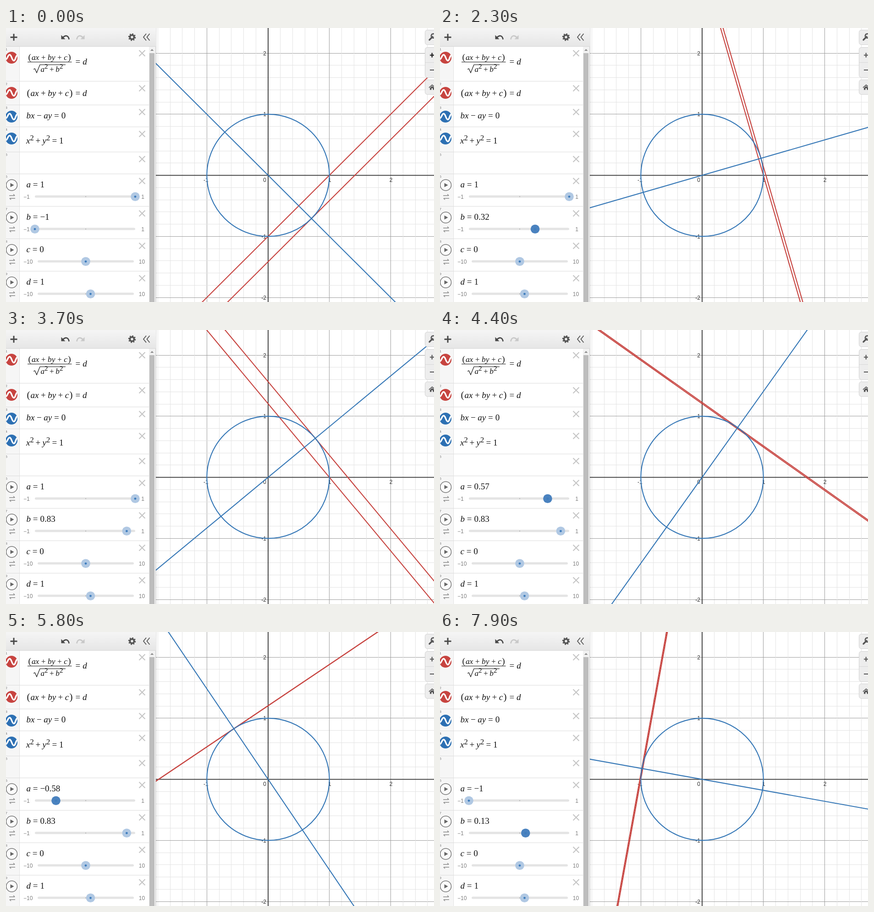
Recreate the animation shown at these times as an HTML page. Size 934 px wide and 600 px high, loop 8000 ms.

```html
<!DOCTYPE html>
<html lang="en">
<head>
<meta charset="utf-8">
<title>Line and unit circle</title>
<style>
html, body { margin: 0; width: 100%; height: 100%; overflow: hidden; background: #fff; }
svg { display: block; width: 934px; height: 600px; }
.math { font: 19px "Liberation Serif", "Times New Roman", serif; fill: #111; }
.it { font-style: italic; }
.axis { font: 12px "Liberation Sans", Arial, sans-serif; fill: #333; }
.small { font: 12px "Liberation Sans", Arial, sans-serif; fill: #808080; }
.num { font: 8px "Liberation Sans", Arial, sans-serif; fill: #777; }
.curve { fill: none; stroke-width: 2.1; }
.red { stroke: #c74440; }
.blue { stroke: #3577b6; }
</style>
</head>
<body>
<svg id="stage" viewBox="0 0 934 600"></svg>
<script>
const NS = "http://www.w3.org/2000/svg";
const stage = document.getElementById("stage");
const CX = 572, CY = 322.6, UNIT = 133.75;
const RED = "#c74440", BLUE = "#2d70b3";

function add(tag, attrs, parent = stage) {
  const el = document.createElementNS(NS, tag);
  for (const k in attrs) el.setAttribute(k, attrs[k]);
  parent.appendChild(el);
  return el;
}
const rect = (x, y, width, height, fill, more) => add("rect", { x, y, width, height, fill, ...more });
const path = (d, stroke, width, more) =>
  add("path", { d, fill: "none", stroke, "stroke-width": width, ...more });
const shape = (d, fill, more) => add("path", { d, fill, ...more });
function text(x, y, cls, str, anchor = "start") {
  const el = add("text", { x, y, class: cls, "text-anchor": anchor });
  el.textContent = str;
  return el;
}

// Pieces: "text|options", options: i = italic, ^ = superscript, p = tall bracket, number = gap before
function formula(x, y, size, pieces) {
  const el = add("text", { x, y, class: "math", style: `font-size:${size}px` });
  let raised = false;
  return pieces.map(p => {
    const [str, opt = ""] = p.split("|");
    const t = add("tspan", {}, el);
    t.textContent = str;
    const gap = parseFloat(opt.replace(/[^\d.]/g, ""));
    if (gap) t.setAttribute("dx", gap);
    if (opt.includes("i")) t.setAttribute("class", "it");
    if (opt.includes("p")) t.setAttribute("font-size", size * 1.1);
    const up = opt.includes("^");
    if (up) t.setAttribute("font-size", size * 0.87);
    if (up !== raised) t.setAttribute("dy", up ? -7 : 7);
    raised = up;
    return t;
  });
}

function drawGrid() {
  for (let i = -10; i <= 14; i++) {
    const major = i % 5 === 0;
    const stroke = major ? "#9c9c9c" : "#e3e3e3";
    const x = Math.floor(CX + i * UNIT / 5) + 0.5;
    const y = Math.floor(CY + i * UNIT / 5) + 0.5;
    if (i) path(`M${x} 0V600`, stroke, 1);
    if (i) path(`M327 ${y}H934`, stroke, 1);
  }
  path(`M${CX} 0V600`, "#333", 1.8);
  path(`M327 ${CY}H934`, "#333", 1.8);
  for (const n of [2, 1, -1, -2]) {
    text(568, CY - n * UNIT + 4.5, "axis", n, "end");
    if (n > -2) text(CX + n * UNIT + (n < 0 ? -2 : 0.5), 337, "axis", n, "middle");
  }
  text(568, 337, "axis", "0", "end");
}

function drawButtons() {
  const box = (y, h) => rect(914.5, y + 0.5, 40, h, "#ededed", { rx: 5, stroke: "#d2d2d2" });
  box(4, 32);
  box(42, 66);
  box(113, 32);
  path("M915 75.5H934", "#d8d8d8", 1);
  path("M924 26L931 19", "#555", 3.4, { "stroke-linecap": "round" });
  path("M936 20A4.5 4.5 0 1 1 934 13", "#555", 2.6);
  const plus = path("M925 59.5H934M929.7 54.5V64.5", "#555", 2.2);
  path("M925 92H934", "#555", 2);
  shape("M922.5 130L930 123.5L937.5 130L936.5 131.2L930 125.8L923.5 131.2Z", "#555");
  shape("M925 131.2L930 127L935 131.2V135.5H931.5V132H928.5V135.5H925Z", "#555");
  return plus;
}

function drawToolbar() {
  const g = add("linearGradient", { id: "bar", x1: 0, y1: 0, x2: 0, y2: 1 });
  add("stop", { offset: 0, "stop-color": "#f5f5f5" }, g);
  add("stop", { offset: 1, "stop-color": "#e6e6e6" }, g);
  rect(0, 0, 327, 40, "url(#bar)");
  path("M0 40.5H327", "#d6d6d6", 1);
  path("M9.5 20.3H24.5M17 12.8V27.8", "#484848", 3);
  const arrow = (color, more) => {
    path("M137.5 25C136.5 17 130.5 14.5 124.5 20.5", color, 2.6, more);
    shape("M120.5 15.5V24.5H129.5Z", color, more);
  };
  arrow("#484848");
  arrow("#c8c8c8", { transform: "translate(292 0) scale(-1 1)" });
  add("circle", { cx: 275, cy: 20, r: 4.6, fill: "none", stroke: "#555", "stroke-width": 3.8 });
  add("circle", { cx: 275, cy: 20, r: 7, fill: "none", stroke: "#555", "stroke-width": 2.6,
    "stroke-dasharray": "2.75 2.75" });
  path("M306 12.5L300 20L306 27.5M313.5 12.5L307.5 20L313.5 27.5", "#555", 1.8);
}

function drawPanel() {
  rect(327, 0, 2, 600, "#000", { opacity: 0.08 });
  rect(0, 0, 327, 600, "#fff");
  rect(0, 40, 29, 560, "#f6f6f6");
  path("M29.5 40V600", "#e2e2e2", 1);
  rect(312, 40, 15, 560, "#f1f1f1");
  rect(313, 55, 11, 545, "#bdbdbd");
  path("M326.5 40V600", "#d0d0d0", 1);
  shape("M315 50L318.7 46L322.4 50Z", "#8a8a8a");
  const tops = [40, 116, 168, 216, 271, 319, 390, 461, 532];
  tops.forEach((y, i) => {
    if (i) path(`M0 ${y + 0.5}H312`, "#dcdcdc", 1);
    text(-1.5, y + 9, "num", i + 1);
    const c = y + (i ? 16 : 15.3);
    path(`M290.5 ${c - 6.5}l13 13m0 -13l-13 13`, "#c6c6c6", 2.2);
  });
  [[65, RED], [142, RED], [194, BLUE], [242, BLUE]].forEach(([y, color]) => {
    add("circle", { cx: 12, cy: y, r: 13, fill: color });
    path(`M-1 ${y + 4}C3 ${y + 4} 4 ${y - 6.5} 8 ${y - 6.5}S13 ${y + 6.5} 17 ${y + 6.5}S21 ${y - 4} 24.5 ${y - 5}`,
      "#fff", 3.4);
  });
}

function drawFormulas() {
  const sum = ["(|p", "ax|i1", "+|4.5", "by|i4.5", "+|4.5", "c|i4.5", ")|p1.2"];
  formula(48.5, 70, 17.4, sum);
  path("M47 74.5H143.5", "#111", 1);
  path("M60 90.5L63 89L67 98L74 80.5H130", "#111", 1.2);
  formula(75.5, 96, 17.2, ["a|i", "2|^", "+|3.5", "b|i3.5", "2|^"]);
  formula(151.5, 80, 19, ["=", "d|i5"]);
  formula(45.5, 149, 19, [...sum, "=|6", "d|i5"]);
  formula(44.5, 198, 19, ["bx|i", "−|4.6", "ay|i4.6", "=|4.8", "0|5"]);
  formula(44, 252.6, 19, ["x|i", "2|^", "+|3.8", "y|i4.3", "2|^", "=|4.3", "1|4.8"]);
}

function slider(name, y, max, left, right) {
  const value = formula(44.5, y - 20, 19, [name + "|i", "=|4.7", "0|5"])[2];
  add("circle", { cx: 12.5, cy: y - 25, r: 12, fill: "#fbfbfb", stroke: "#777", "stroke-width": 1.5 });
  shape(`M9.5 ${y - 29.5}L17.5 ${y - 25}L9.5 ${y - 20.5}Z`, "#666");
  path(`M7 ${y - 2}H19M16 ${y - 5}L19.3 ${y - 2}M20 ${y + 4}H8M11 ${y + 7}L7.7 ${y + 4}`, "#888", 1.3);
  text(38, y + 4.5, "small", "−" + max);
  text(max > 1 ? 296.5 : 298.5, y + 4.5, "small", max, "middle");
  rect(left, y - 2.5, right - left, 5, "#e4e4e4", { rx: 2.5 });
  add("circle", { cx: 174, cy: y + 0.3, r: 1, fill: "#aaa" });
  const knob = add("circle", { cy: y + 0.3, r: 9.8 });
  const dot = add("circle", { cy: y + 0.3, r: 2.4, fill: "#3f7dbd" });
  return (v, active) => {
    const x = left + (right - left) * (v + max) / (2 * max);
    value.textContent = String(v).replace("-", "−");
    knob.setAttribute("cx", x);
    dot.setAttribute("cx", x);
    knob.setAttribute("fill", active ? "#4a82bf" : "#b0c8e3");
  };
}

drawGrid();
const curve = (tag, cls, more) => add(tag, { class: "curve " + cls, ...more });
const tangent = curve("line", "red"), plain = curve("line", "red"), normal = curve("line", "blue");
curve("circle", "blue", { cx: CX, cy: CY, r: UNIT });
const plus = drawButtons();
drawPanel();
drawToolbar();
drawFormulas();
const setA = slider("a", 369, 1, 63, 282);
const setB = slider("b", 440, 1, 63, 282);
slider("c", 511, 10, 69, 279)(0, false);
slider("d", 582, 10, 69, 279)(1, false);

// Draws p*x + q*y = k
function place(el, p, q, k) {
  const n = Math.hypot(p, q), x = p * k / n / n, y = q * k / n / n, r = 12 / n;
  const ends = { x1: x - q * r, y1: y + p * r, x2: x + q * r, y2: y - p * r };
  for (const e in ends) el.setAttribute(e, e[0] === "x" ? CX + ends[e] * UNIT : CY - ends[e] * UNIT);
}

const aKeys = [[3900, 1], [4360, 0.59], [4400, 0.57], [4800, 0.16], [5160, -0.2], [5200, -0.22],
  [5700, -0.54], [6360, -0.8], [6400, -0.83], [6600, -1]];
const bKeys = [[1200, -1], [1460, -0.53], [1500, -0.47], [1800, -0.13], [2100, 0.16], [2500, 0.48],
  [2960, 0.76], [3000, 0.77], [3700, 0.83], [7100, 0.83], [7500, 0.52], [7860, 0.18], [7900, 0.13]];

function at(keys, t) {
  if (t <= keys[0][0]) return keys[0][1];
  for (let i = 1; i < keys.length; i++) {
    const [t0, v0] = keys[i - 1], [t1, v1] = keys[i];
    if (t <= t1) return Math.round((v0 + (v1 - v0) * (t - t0) / (t1 - t0)) * 100) / 100;
  }
  return keys[keys.length - 1][1];
}

// The graph is redrawn a moment after the sliders move
const LOOP = 8000, STEP = 100, LAG = 40;
const start = performance.now();
function render(now) {
  const t = Math.floor(Math.max(0, now - start) % LOOP / STEP) * STEP;
  setA(at(aKeys, t), t >= 4000 && t < 6800);
  setB(at(bKeys, t), (t >= 1100 && t < 3700) || t >= 7000);
  const a = at(aKeys, t - LAG), b = at(bKeys, t - LAG);
  place(tangent, a, b, Math.hypot(a, b));
  place(plain, a, b, 1);
  place(normal, b, -a, 0);
  plus.setAttribute("stroke", t < STEP ? "#111" : "#555");
  requestAnimationFrame(render);
}
render(start);
</script>
</body>
</html>
```
